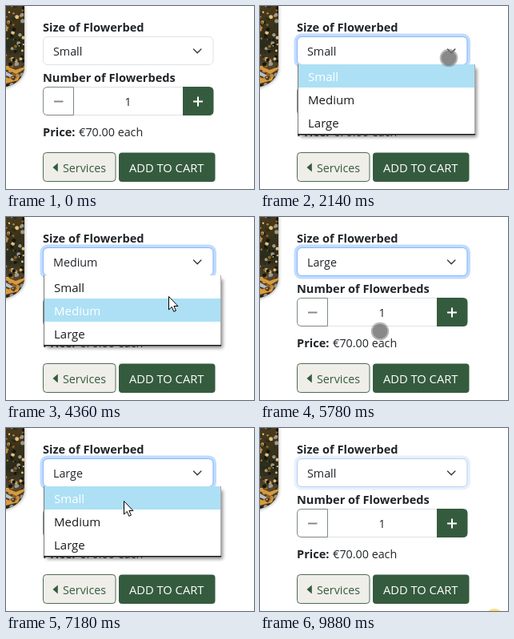
An HTML page for the animation above (9.98 s loop, 310x229 px).

```html
<!DOCTYPE html>
<html lang="en">
<head>
<meta charset="utf-8">
<title>Flowerbed order form</title>
<style>
html, body { margin: 0; width: 100%; height: 100%; overflow: hidden; background: #fff; }
svg { display: block; width: 100%; height: 100%; }
text { font: 14.3px "Open Sans", "Noto Sans", sans-serif; fill: #212529; }
.bold { font-size: 14.6px; font-weight: 700; }
.list text { font-size: 15px; fill: #1b1b1b; }
.list text.on { fill: #fff; }
</style>
</head>
<body>
<svg viewBox="0 0 310 229">
  <defs>
    <clipPath id="round"><path d="M0 0H23V79Q19 97 0 101Z"/></clipPath>
    <linearGradient id="tones" x2="0" y2="1">
      <stop offset="0" stop-color="#4a3a1e"/>
      <stop offset=".5" stop-color="#2b2a18"/>
      <stop offset=".75" stop-color="#54452e"/>
      <stop offset="1" stop-color="#33281c"/>
    </linearGradient>
    <filter id="soft" x="-20%" y="-20%" width="140%" height="140%"><feGaussianBlur stdDeviation="2"/></filter>
  </defs>

  <path d="M-9 0H23V81Q19 99 -9 104Z" fill="#000" opacity=".4" filter="url(#soft)"/>
  <g clip-path="url(#round)">
    <rect width="23" height="101" fill="url(#tones)"/>
    <g id="lights"></g>
    <path d="M0 75L12 80 23 76V79L13 85 0 79ZM0 89L10 93 18 86 15 93 0 97Z" fill="#d99a3a"/>
    <path d="M0 82L9 87 5 89 0 87Z" fill="#b9bfc4"/>
  </g>

  <text class="bold" x="46" y="32">Size of Flowerbed</text>
  <rect x="46.5" y="38.5" width="212.5" height="35" rx="5.5" fill="#fff" stroke="#dee2e6"/>
  <g id="ring" fill="none">
    <rect x="44.5" y="36.5" width="216.5" height="39" rx="7.5" stroke="#c2dbfe" stroke-width="4"/>
    <rect x="46.5" y="38.5" width="212.5" height="35" rx="5.5" stroke="#86b7fe"/>
  </g>
  <text id="value" x="59" y="62">Small</text>
  <path d="M234.5 54l4.7 4.7 4.7-4.7" fill="none" stroke="#343a40" stroke-width="1.4" stroke-linecap="round" stroke-linejoin="round"/>

  <text class="bold" x="46" y="95">Number of Flowerbeds</text>
  <path d="M84 101.5H221M84 136.5H221" stroke="#dee2e6"/>
  <path d="M84.5 101.5H52Q46.5 101.5 46.5 107V131Q46.5 136.5 52 136.5H84.5Z" fill="#fff" stroke="#7d8a82"/>
  <path d="M60 119.5H71.5" stroke="#7d8a82" stroke-width="1.9"/>
  <text x="152.5" y="125" text-anchor="middle">1</text>
  <path d="M221 101H253.5Q259.5 101 259.5 107V131Q259.5 137 253.5 137H221Z" fill="#355b3e"/>
  <path d="M234 119.5H246M240 113.5V125.5" stroke="#fff" stroke-width="2"/>

  <text class="bold" x="46" y="163">Price:</text>
  <text x="91" y="163">€70.00 each</text>

  <rect x="46.5" y="183.5" width="90.5" height="36" rx="4" fill="#efeee9" stroke="#4f6b56"/>
  <path d="M58.5 202L64.8 196.5V207.5Z" fill="#355b3e"/>
  <text x="71" y="208" style="fill:#355b3e">Services</text>
  <rect x="141" y="183.5" width="120.5" height="36.5" rx="4" fill="#355b3e"/>
  <text x="154" y="208" style="fill:#fff;font-size:14.7px">ADD TO CART</text>

  <g id="popup" class="list">
    <rect x="51" y="78" width="220" height="86" fill="#000" opacity=".45" filter="url(#soft)"/>
    <rect x="47" y="73" width="222" height="88.5" fill="#fff"/>
    <path d="M47.5 73V161" stroke="#777"/>
    <path d="M268.5 73V161" stroke="#aaa"/>
    <path d="M47 160.7H269" stroke="#111" stroke-width="1.5"/>
    <rect id="mark" x="48" width="220" height="29" fill="#ade0f5"/>
  </g>

  <circle id="halo" cx="293" r="12" fill="#ffe07a"/>
  <g id="touch">
    <circle r="11.3" fill="#707070" opacity=".5"/>
    <circle r="9.3" fill="#707070" opacity=".65"/>
  </g>
  <path id="arrow" d="M-.5 .5V17L3.3 13.500 5.800 19.300 8.400 18.200 5.900 12.500H11Z" fill="#fff" stroke="#000" stroke-linejoin="round"/>
</svg>
<script>
const LOOP = 9980, TOP = 73, ROW = 29, LAG = 100;
const sizes = ["Small", "Medium", "Large"];
const $ = id => document.getElementById(id);
const clamp = v => Math.min(1, Math.max(0, v));
const ramp = (t, from, to) => clamp((t - from) / (to - from));
const show = (el, on) => el.setAttribute("visibility", on ? "visible" : "hidden");

function add(parent, tag, attrs, text = "") {
  const el = document.createElementNS("http://www.w3.org/2000/svg", tag);
  for (const key in attrs) el.setAttribute(key, attrs[key]);
  el.textContent = text;
  parent.append(el);
  return el;
}

const rows = sizes.map((name, i) => add($("popup"), "text", { x: 60, y: 94 + ROW * i }, name));

let seed = 7;
const rand = () => (seed = seed * 16807 % 2147483647) / 2147483647;
const tints = ["#b98a4a", "#14170d", "#8d6226", "#e2c27c", "#27301c", "#14170d", "#9a9a90"];
for (let i = 0; i < 90; i++)
  add($("lights"), "circle", { cx: rand() * 23, cy: rand() * 100, r: .8 + rand() * 1.8, fill: tints[i % tints.length] });

// pointer stops: time, x, y
const path = [
  [640, 308, 240], [1140, 236, 65], [2140, 236, 65], [2360, 216, 114], [2720, 216, 103],
  [3560, 216, 103], [3880, 232, 45], [4200, 232, 45], [4360, 204, 99], [4780, 150, 143],
  [5780, 150, 143], [6300, 172, 58], [6640, 172, 58], [7180, 148, 91], [7760, 148, 91], [8200, 324, 140]
];
// list times: opens, pointer turns to arrow, closes; then the choice made
const lists = [[1600, 2160, 2640, 1], [4200, 4220, 4960, 2], [6580, 6640, 7780, 0]];

function pointer(t) {
  const i = path.findIndex(p => p[0] > t);
  if (i < 1) return null;
  const [t0, x0, y0] = path[i - 1], [t1, x1, y1] = path[i];
  const k = ramp(t, t0, t1), e = k * k * (3 - 2 * k);
  return { x: x0 + (x1 - x0) * e, y: y0 + (y1 - y0) * e };
}

function draw(t) {
  const p = pointer(t);
  const list = lists.find(l => t >= l[0] && t < l[2]);
  const chosen = lists.reduce((c, l) => t >= l[2] ? l[3] : c, 0);
  const isArrow = list && t >= list[1];

  $("value").textContent = sizes[chosen];
  $("ring").setAttribute("opacity", ramp(t, 1400, 1550) * (1 - .6 * ramp(t, 9790, 9880)));

  show($("popup"), list);
  if (list) {
    // the highlight trails the pointer a little
    const y = pointer(t - LAG).y;
    const on = isArrow && y > TOP ? Math.min(2, Math.floor((y - TOP) / ROW)) : chosen;
    $("popup").setAttribute("opacity", ramp(t, list[0] - 20, list[0] + 80));
    $("mark").setAttribute("y", TOP + ROW * on);
    rows.forEach((row, i) => row.setAttribute("class", i === on ? "on" : ""));
  }

  show($("touch"), p && !isArrow);
  show($("arrow"), isArrow);
  if (p) for (const id of ["touch", "arrow"]) $(id).setAttribute("transform", `translate(${p.x} ${p.y})`);

  show($("halo"), t >= 9800);
  $("halo").setAttribute("cy", 243 - 5 * ramp(t, 9800, 9880));
}

const start = performance.now();
function tick() {
  draw((performance.now() - start) % LOOP);
  requestAnimationFrame(tick);
}
tick();
</script>
</body>
</html>
```
